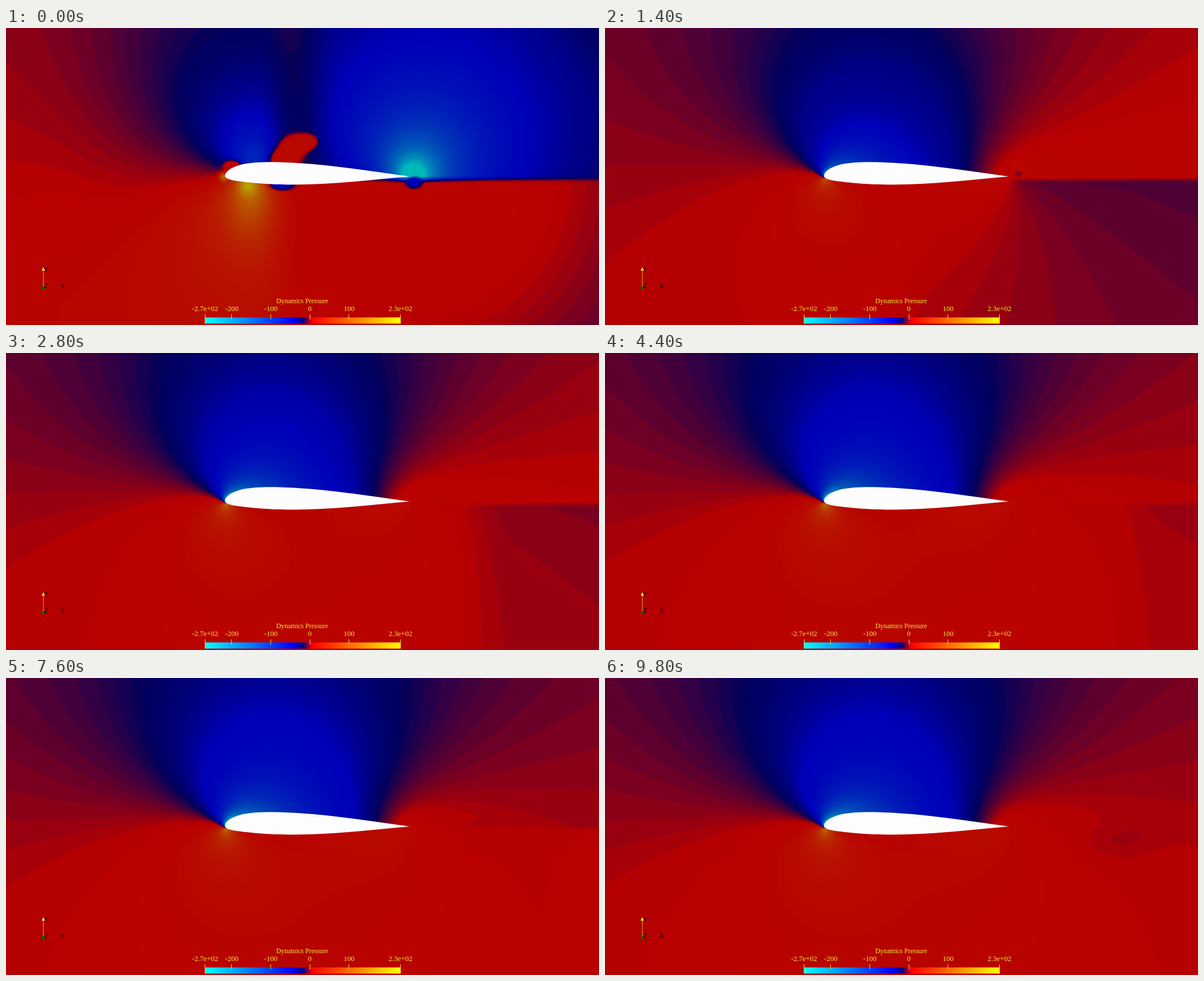
An HTML page with a canvas that plays this animation: 1056x530 px, repeating every 10 s.

```html
<!DOCTYPE html>
<html lang="en">
<head>
<meta charset="utf-8">
<title>Airfoil pressure field</title>
<style>
  html, body { margin: 0; width: 100%; height: 100%; overflow: hidden; background: #b80000; }
  canvas, svg { position: absolute; left: 0; top: 0; width: 1056px; height: 530px; display: block; }
  .serif { font: 13px "Liberation Serif", "Times New Roman", serif; fill: #f4ee3c; text-anchor: middle; }
  .axis { font: 11px "Liberation Sans", Arial, sans-serif; fill: #0a0000; }
</style>
</head>
<body>
<canvas id="field" width="1056" height="530"></canvas>
<svg viewBox="0 0 1056 530">
  <defs>
    <linearGradient id="bar">
      <stop offset="0" stop-color="#0ff"/>
      <stop offset=".45" stop-color="#00f"/>
      <stop offset=".5" stop-color="#000080"/>
      <stop offset=".55" stop-color="#f00"/>
      <stop offset="1" stop-color="#ff0"/>
    </linearGradient>
  </defs>
  <path fill="#fdfdfd" d="M390 264C390 256 402 248 420 243.500C438 239.500 460 239 480 239.300C560 241 640 254 719 265C650 271 580 279.500 515 279.500C470 279.500 440 277 405 272C395 270 390 267 390 264Z"/>

  <path d="M66.500 463.500H98" stroke="#d00000"/>
  <path d="M66.500 463V432" stroke="#d8a028"/>
  <path d="M66.500 426.500L69.500 433H63.500Z" fill="#f4ee20"/>
  <rect x="64" y="461" width="5" height="5" rx="1" fill="#006a00"/>
  <g class="axis">
    <text x="67" y="434.500">Y</text>
    <text x="68" y="463.500" font-style="italic">Z</text>
    <text x="97" y="464">X</text>
  </g>

  <rect x="354" y="516.500" width="349" height="11" fill="url(#bar)"/>
  <path d="M354.500 511V527M401.500 511V520M471.500 511V520M541.500 511V520M610.500 511V520M702.500 511V527" stroke="#e8d848" fill="none"/>
  <g class="serif">
    <text x="527.500" y="491" style="font-size:12px">Dynamics Pressure</text>
    <text x="354.500" y="505">-2.7e+02</text>
    <text x="402" y="505">-200</text>
    <text x="471.500" y="505">-100</text>
    <text x="541" y="505">0</text>
    <text x="611" y="505">100</text>
    <text x="702.500" y="505">2.3e+02</text>
  </g>
</svg>
<script>
const W = 1056, H = 530, STEP = 4, LOOP = 10000, TICK = 200;
const COLS = W / STEP + 2, ROWS = Math.ceil(H / STEP) + 2;
const ctx = document.getElementById('field').getContext('2d');
const image = ctx.createImageData(W, H);
const pixels = new Uint32Array(image.data.buffer);

const clamp = (x, a, b) => Math.min(b, Math.max(a, x));
const mix = (a, b, k) => a + (b - a) * k;
const smooth = (a, b, x) => { const k = clamp((x - a) / (b - a), 0, 1); return k * k * (3 - 2 * k); };
const bell = (x, y, cx, cy, rx, ry) => Math.exp(-(((x - cx) / rx) ** 2) - ((y - cy) / ry) ** 2);

// Levels: -10 cyan, -1 blue, 0 navy, 1 red, 10 yellow; dimmed by the surface light
const LIGHT = 184;
const lut = Uint32Array.from({ length: 256 }, (_, i) => {
  const v = i / 255 * 20 - 10;
  const r = clamp(v, 0, 1);
  const g = clamp((Math.abs(v) - 1) / 9, 0, 1);
  const b = v < 0 ? mix(.5, 1, Math.min(1, -v)) : .5 * (1 - r);
  const c = k => Math.round(k * LIGHT);
  return (255 << 24 | c(b) << 16 | c(g) << 8 | c(r)) >>> 0;
});

// Complex helpers on [re, im]
const mul = (a, b) => [a[0] * b[0] - a[1] * b[1], a[0] * b[1] + a[1] * b[0]];
const div = (a, b) => {
  const d = b[0] * b[0] + b[1] * b[1] + 1e-6;
  return [(a[0] * b[0] + a[1] * b[1]) / d, (a[1] * b[0] - a[0] * b[1]) / d];
};
const root = a => {
  const m = Math.hypot(a[0], a[1]);
  return [Math.sqrt(Math.max(0, (m + a[0]) / 2)), Math.sqrt(Math.max(0, (m - a[0]) / 2)) * (a[1] < 0 ? -1 : 1)];
};

// Lifting flow past a Joukowski profile, in units of a quarter chord
const FAR = .8, GAIN = 7.3, ALPHA = .091, CX = -.09, CY = .03;
const R = Math.hypot(1 - CX, CY);
const SPIN = 2 * R * Math.sin(ALPHA + Math.asin(CY / R));

function steadyLevel(x, y) {
  const z = [(x - 555) / 82, (265 - y) / 82];
  const s1 = root([z[0] - 2, z[1]]), s2 = root([z[0] + 2, z[1]]);
  const s = mul(s1, s2);
  let p = [(z[0] + s[0]) / 2, (z[1] + s[1]) / 2];
  let d = [p[0] - CX, p[1] - CY];
  const m = Math.hypot(d[0], d[1]);
  if (m < R) {
    d = [d[0] / m * R, d[1] / m * R];
    p = [d[0] + CX, d[1] + CY];
  }
  const ca = Math.cos(ALPHA), sa = Math.sin(ALPHA);
  const dip = div([R * R * ca, R * R * sa], mul(d, d));
  const vort = div([0, SPIN], d);
  const w = [ca - dip[0] + vort[0], -sa - dip[1] + vort[1]];
  const q = div([1, 0], mul(p, p));
  const u = div(w, [1 - q[0], -q[1]]);
  const v = FAR + GAIN * (1 - Math.min(4, u[0] * u[0] + u[1] * u[1]));
  const a = Math.abs(v);
  return a > 1 ? Math.sign(v) * (1 + .35 * (a - 1) ** 1.4) : v;
}

// Impulsive start: suction at nose and tail, with small separated pockets
function startLevel(x, y) {
  const h = 262 - y, dx = x - 440, right = smooth(440, 540, x);
  let v = FAR + .17 * (1 - smooth(60, 320, x));
  v -= 215 * h / (h * h + dx * dx + 900) * (1 - right);

  const r = Math.hypot(x - 722, y - 266);
  const ang = Math.abs(Math.atan2(290 - y, x - 722));
  const above = smooth(275, 263, y);
  const pull = 470 / (r + 22) * (.5 * Math.sin(ang) + .5 * (1 - ang / Math.PI) + .3);
  v -= above * pull * smooth(430, 600, x) * (1 - .25 * smooth(330, 450, r));
  v += (1 - above) * (.3 * right - .55 * smooth(600, 760, x) * smooth(190, 460, r));
  if (y > 262) v += 4 * bell(x, y, 429, 276, 17, 20) + 1.5 * bell(x, y, 430, 290, 34, 80);

  const high = bell(x, y, 511, 212, 25, 24) + bell(x, y, 538, 202, 17, 13)
    + bell(x, y, 492, 236, 24, 20) + bell(x, y, 402, 246, 18, 12);
  const low = bell(x, y, 490, 279, 25, 11) + bell(x, y, 726, 274, 16, 12);
  v = mix(v, 1.4, smooth(.15, .75, high));
  v = mix(v, -1, smooth(.15, .75, low));
  return v + 5 * bell(x, y, 387, 265, 7, 7);
}

// Jump across the wake, cut along the line behind the tail
function wakeShape(x, y) {
  const ang = Math.atan2(268 - y, x - 722);
  return (1 - Math.abs(ang) / Math.PI) * clamp((268 - y) / 3, -1.7, 1);
}

const make = f => Float32Array.from({ length: COLS * ROWS }, (_, i) =>
  f(i % COLS * STEP, Math.floor(i / COLS) * STEP));
const steady = make(steadyLevel), start = make(startLevel), wake = make(wakeShape);
const grid = new Float32Array(COLS * ROWS);

// time, lift, wake jump, wake front, eddy x, y, rx, ry, strength
const keys = [
  [0, .6, .5, 500, 722, 264, 6, 6, -.5],
  [1400, .73, .29, 520, 736, 260, 6, 5, -.9],
  [2800, .9, .14, 840, 757, 257, 12, 6, -.25],
  [4400, .97, .07, 940, 797, 249, 24, 11, -.13],
  [6000, 1, -.05, 1000, 805, 255, 28, 16, -.05],
  [7600, 1, -.06, 1000, 850, 288, 35, 22, -.06],
  [9800, 1, 0, 900, 920, 288, 66, 34, -.15]
];

function stateAt(t) {
  let i = 0;
  while (i < keys.length - 2 && t > keys[i + 1][0]) i++;
  const a = keys[i], b = keys[i + 1];
  const k = clamp((t - a[0]) / (b[0] - a[0]), 0, 1);
  return a.map((n, j) => mix(n, b[j], k));
}

function draw(t) {
  const [, lift, jump, front, ex, ey, rx, ry, eddy] = stateAt(t);
  const early = t < 1200 ? Math.exp(-t / 260) * (1 - t / 1200) : 0;
  for (let j = 0, i = 0; j < ROWS; j++) {
    for (let c = 0; c < COLS; c++, i++) {
      const x = c * STEP, y = j * STEP;
      const k = y > 268 ? smooth(front - 60, front + 60, x) : 1;
      const v = FAR + lift * (steady[i] - FAR) + jump * k * wake[i] + eddy * bell(x, y, ex, ey, rx, ry);
      grid[i] = mix(v, start[i], early);
    }
  }
  for (let y = 0, n = 0; y < H; y++) {
    const row = Math.floor(y / STEP) * COLS, fy = y % STEP / STEP;
    for (let c = 0; c < W / STEP; c++) {
      const i = row + c;
      const a = mix(grid[i], grid[i + COLS], fy);
      const b = mix(grid[i + 1], grid[i + COLS + 1], fy);
      for (let s = 0; s < STEP; s++) {
        const v = a + (b - a) * s / STEP;
        pixels[n++] = lut[clamp(Math.round((v + 10) * 12.75), 0, 255)];
      }
    }
  }
  ctx.putImageData(image, 0, 0);
}

let shown = -1;
const begin = performance.now();
function loop() {
  const t = Math.floor((performance.now() - begin) % LOOP / TICK) * TICK;
  if (t !== shown) draw(shown = t);
  requestAnimationFrame(loop);
}
loop();
</script>
</body>
</html>
```
